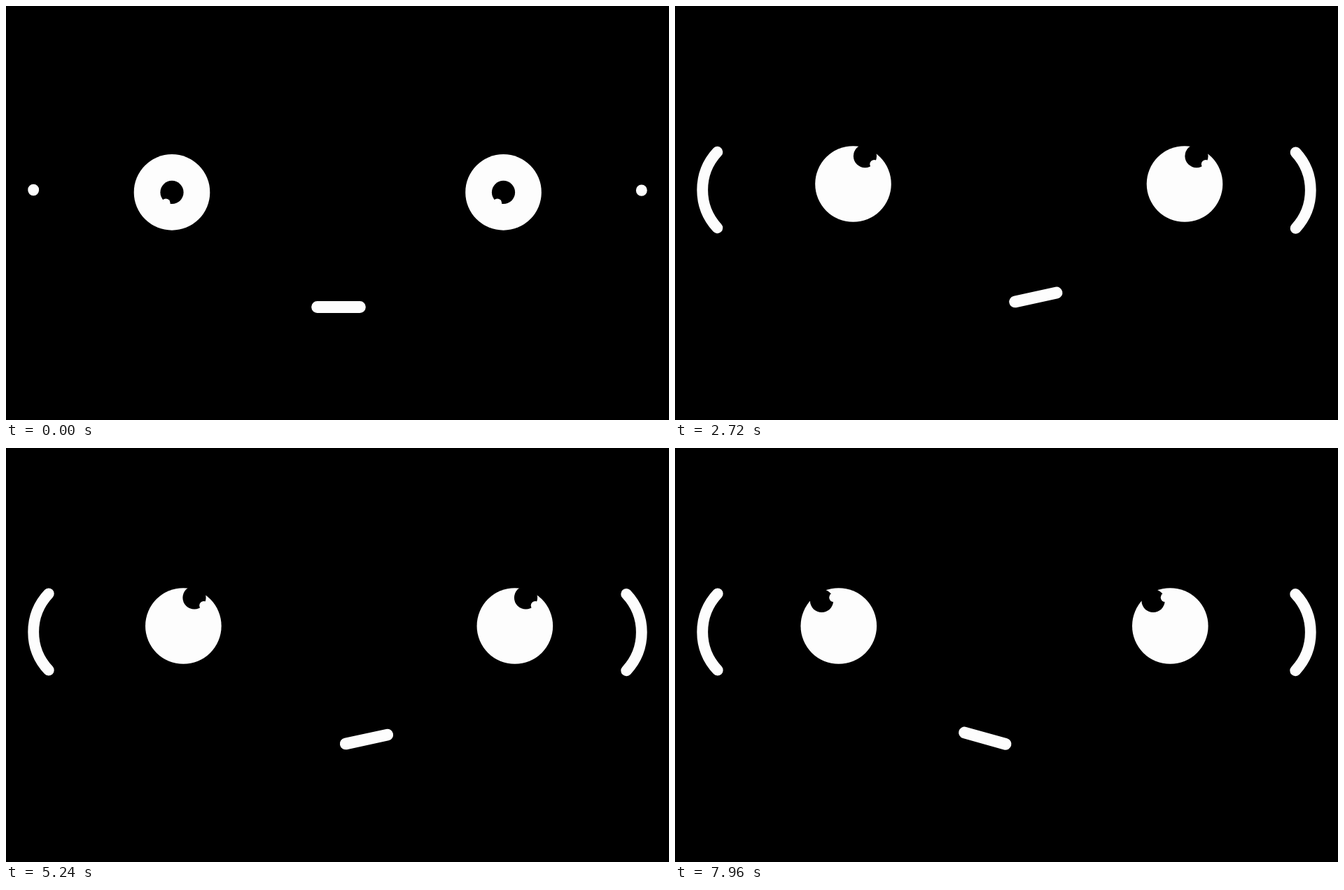
Write an HTML page with a canvas that moves like this. It is 947 px wide and 592 px high and loops after 8 s.

```html
<!DOCTYPE html>
<html>
<head>
<meta charset="utf-8">
<style>
  html, body { margin: 0; width: 100%; height: 100%; overflow: hidden; background: #000; }
  canvas { display: block; }
</style>
</head>
<body>
<canvas id="stage" width="947" height="592"></canvas>
<script>
const ctx = document.getElementById('stage').getContext('2d');
const WHITE = '#fdfdfd', BLACK = '#000';
const LOOP = 8000, PULSE = 2500, MOVE = 1000;
const RAD = Math.PI / 180;

// Head poses: ahead, up to the right, up to the left.
const poses = [
  { eyeX: 237, eyeY: 266.4, gaze: 0, turn: 11, mouthX: 475, mouthY: 280, tilt: 0 },
  { eyeX: 254.5, eyeY: 254.5, gaze: 43.4, turn: -67, mouthX: 483.3, mouthY: 269.4, tilt: -12.3 },
  { eyeX: 233.8, eyeY: 254.5, gaze: 43.4, turn: -124, mouthX: 483.3, mouthY: 270.2, tilt: 15.6 }
];
const moveStarts = [0, 5000];
const delays = { gaze: 40, turn: 40, mouthX: 130, mouthY: 130, tilt: 130 };

// Opening of the side arcs over one pulse: [ms, share of the full angle].
const opening = [
  [0, 0], [100, .48], [220, .94], [340, 1], [460, .95], [720, .9], [900, .87],
  [1400, .66], [1520, .565], [1670, 0], [1860, .6], [2080, .85], [2500, 0]
];

const clamp = u => Math.min(1, Math.max(0, u));
const ease = u => u < .5 ? 4 * u ** 3 : 1 - 4 * (1 - u) ** 3;

function poseAt(t) {
  const pose = {};
  for (const key in poses[0]) {
    pose[key] = poses[0][key];
    moveStarts.forEach((start, i) => {
      const u = ease(clamp((t - start - (delays[key] || 0)) / MOVE));
      pose[key] += (poses[i + 1][key] - poses[i][key]) * u;
    });
  }
  return pose;
}

function openingAt(t) {
  const ms = t % PULSE;
  const i = opening.findIndex(([time]) => time > ms);
  const [t0, v0] = opening[i - 1], [t1, v1] = opening[i];
  return v0 + (v1 - v0) * (ms - t0) / (t1 - t0);
}

function disc(x, y, r, color) {
  ctx.fillStyle = color;
  ctx.beginPath();
  ctx.arc(x, y, r, 0, 2 * Math.PI);
  ctx.fill();
}

function eye(x, y, gaze, turn) {
  const a = turn * RAD, b = a + 108.5 * RAD;
  const px = x + gaze * Math.cos(a), py = y + gaze * Math.sin(a);
  disc(x, y, 54.3, WHITE);
  disc(px, py, 16.6, BLACK);
  disc(px + 17.6 * Math.cos(b), py + 17.6 * Math.sin(b), 6.3, WHITE);
}

function sideArc(x, y, facing, half) {
  ctx.lineWidth = 15.8;
  ctx.beginPath();
  ctx.arc(x, y, 80, facing - half, facing + half);
  ctx.stroke();
}

function mouth(x, y, tilt) {
  ctx.save();
  ctx.translate(x, y);
  ctx.rotate(tilt * RAD);
  ctx.lineWidth = 16.8;
  ctx.beginPath();
  ctx.moveTo(-30.4, 150.5);
  ctx.lineTo(30.4, 150.5);
  ctx.stroke();
  ctx.restore();
}

function draw(t) {
  const p = poseAt(t);
  const half = Math.max(.002, openingAt(t) * 45.4 * RAD);
  ctx.fillStyle = BLACK;
  ctx.fillRect(0, 0, 947, 592);
  ctx.strokeStyle = WHITE;
  ctx.lineCap = 'round';
  eye(p.eyeX, p.eyeY, p.gaze, p.turn);
  eye(p.eyeX + 473.5, p.eyeY, p.gaze, p.turn);
  sideArc(119.2, 263, Math.PI, half);
  sideArc(827.8, 263.6, 0, half);
  mouth(p.mouthX, p.mouthY, p.tilt);
}

const begin = performance.now();
function tick() {
  draw((performance.now() - begin) % LOOP);
  requestAnimationFrame(tick);
}
tick();
</script>
</body>
</html>
```
